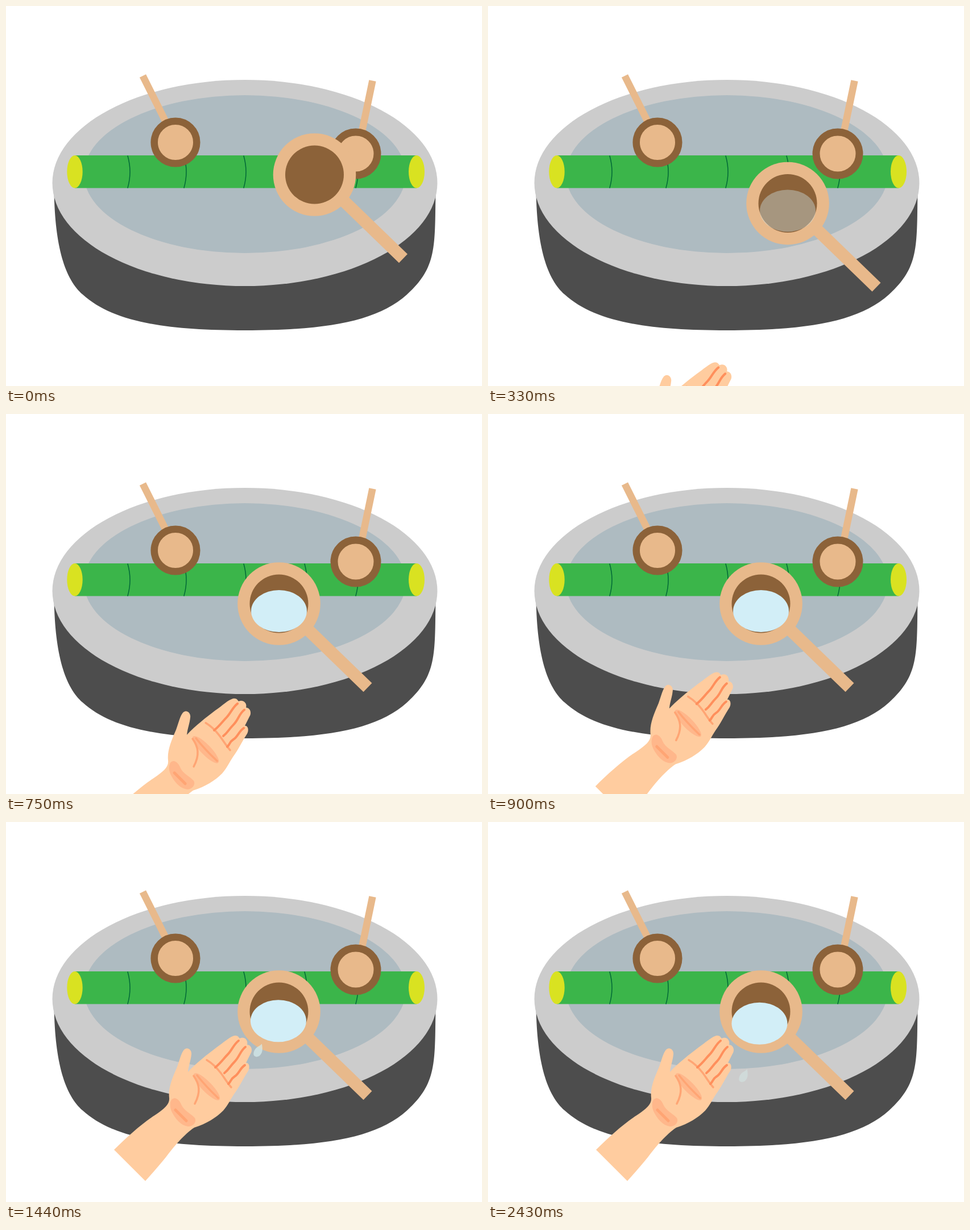
Animation of 837 by 669 pixels, one loop 2700 ms. Source, as an HTML page:

```html
<!DOCTYPE html>
<html lang="en">
<head>
<meta charset="utf-8">
<title>Water basin</title>
<style>
  html, body { margin: 0; width: 100%; height: 100%; overflow: hidden; background: #fff; }
  svg { display: block; width: 100%; height: 100%; }
  .line { fill: none; stroke-linecap: round; stroke-linejoin: round; }
</style>
</head>
<body>
<svg viewBox="0 0 837 669">
  <defs>
    <path id="drop" d="M6.500-11.500C8-4 8.500 3 4 8C1 11.500-4 12.500-7 9.500C-9.500 6-7-1-3-4.500C1-7.500 4-8.500 6.500-11.500Z" fill="#d5edec"/>
    <path id="joint" class="line" stroke="#006837" stroke-width="1.500" d="M0 264q8 28 0 56"/>
  </defs>

  <!-- basin -->
  <path fill="#4d4d4d" d="M84.500 325C86 425 104 481 135 508C188 556 280 571 420 571S652 556 705 508S754 425 755.500 325Z"/>
  <ellipse cx="420" cy="311.500" rx="338.500" ry="181.500" fill="#ccc"/>
  <ellipse cx="420" cy="296" rx="283" ry="139" fill="#aebbc1"/>

  <!-- bamboo -->
  <rect x="121" y="263" width="601" height="57.500" fill="#3bb54a"/>
  <use href="#joint" x="214"/>
  <use href="#joint" x="313"/>
  <use href="#joint" x="418"/>
  <use href="#joint" x="525"/>
  <use href="#joint" x="615"/>
  <g fill="#d9e221">
    <ellipse cx="121" cy="291.800" rx="13.700" ry="28.700"/>
    <ellipse cx="722" cy="291.800" rx="14" ry="28.700"/>
  </g>

  <!-- resting ladles -->
  <g fill="#e8b98b" stroke="#8c6239">
    <path stroke="#e8b98b" stroke-width="12.500" d="M240.500 123L285 212M644.500 131.500L623 235"/>
    <circle cx="298" cy="240" r="37.300" stroke-width="12.500"/>
    <circle cx="615" cy="260" r="38" stroke-width="13"/>
  </g>

  <!-- moving ladle -->
  <g id="ladle">
    <path d="M42 37L156 147.500" stroke="#e8b98b" stroke-width="21.500"/>
    <circle r="72.800" fill="#e8b98b"/>
    <circle r="51.500" fill="#8c6239"/>
    <ellipse id="water" rx="49" ry="37" fill="#d2eef7"/>
  </g>

  <!-- hand -->
  <g id="hand">
    <path fill="#ffcc9f" d="M190 577C212 555 240 530 262 516C278 505 288 497 287 486C285 468 292 452 301 431C306 417 308 407 313 401C318 395 327 400 326 409C325 420 321 429 320 440C335 424 353 410 370 397C382 389 394 377 403 376C408 376 409 379 411 381C419 377 426 384 424 392C432 393 434 402 430 408L422 424C428 424 429 432 426 438C418 450 410 467 401 479C395 488 390 499 382 508C369 521 353 531 331 538C313 550 294 573 282 589C270 604 257 619 245 632Z"/>
    <g fill="#ffb78b">
      <ellipse rx="32" ry="9" transform="translate(353 466) rotate(46)"/>
      <path d="M291 489C297 482 305 489 308 497C313 509 325 513 332 521C336 528 329 536 321 536C308 535 297 522 291 509C288 502 288 494 291 489Z"/>
    </g>
    <g class="line" stroke="#ffa574" stroke-width="3.500">
      <path d="M353 419C363 425 370 432 377 441S388 458 396 467M330 447C340 461 343 475 332 496M336 446Q350 464 373 486"/>
      <path d="M298 507L317 526" stroke-width="5"/>
    </g>
    <path class="line" stroke="#ff8f5c" stroke-width="4" d="M409 385C400 392 397 402 390 409S378 424 368 432M421 396C411 404 411 413 402 422S392 436 384 442M420 428C411 434 410 443 402 448S396 457 391 461"/>
  </g>

  <g id="drops"></g>
</svg>
<script>
const LOOP = 2700, STEP = 30, LAST = 2430;
const $ = id => document.getElementById(id);

const ramp = (t, from, to) => Math.max(0, Math.min(1, (t - from) / (to - from)));
const ease = (t, from, to) => {
  const u = ramp(t, from, to);
  return u * u * (3 - 2 * u);
};
const move = (el, x, y) => el.setAttribute('transform', `translate(${x} ${y})`);

// Drops leave the ladle and fingertips one after another
const DROP_TIME = 800;
const drops = [[448, 388.5], [427.5, 363.5], [465.6, 399]].map(([x, y], i) => {
  const el = document.createElementNS('http://www.w3.org/2000/svg', 'use');
  el.setAttribute('href', '#drop');
  $('drops').append(el);
  return { el, x, y, start: 1242 + 248 * i };
});

function draw(now) {
  const t = Math.min(LAST, Math.floor(now % LOOP / STEP) * STEP);

  // The ladle dips while it is drawn left and lifted
  const dip = ease(t, 0, 496), pull = ease(t, 157, 690);
  move($('ladle'), 542.5 - 62.5 * pull, 297 + 84 * dip - 47 * pull);

  const sink = 7.7 * ramp(t, 900, 2200);
  move($('water'), -sink / 3, 13 + sink);
  $('water').setAttribute('opacity', ramp(t, 115, 700));

  const away = 1 - ease(t, 0, 1360);
  move($('hand'), -4.5 * away, 295 * away);

  for (const { el, x, y, start } of drops) {
    const u = ramp(t, start, start + DROP_TIME);
    move(el, x - 19 * u, y + 55 * u);
    el.setAttribute('opacity', Math.sin(Math.PI * u));
  }
}

let start;
function tick(now) {
  start ??= now;
  draw(now - start);
  requestAnimationFrame(tick);
}
draw(0);
requestAnimationFrame(tick);
</script>
</body>
</html>
```
